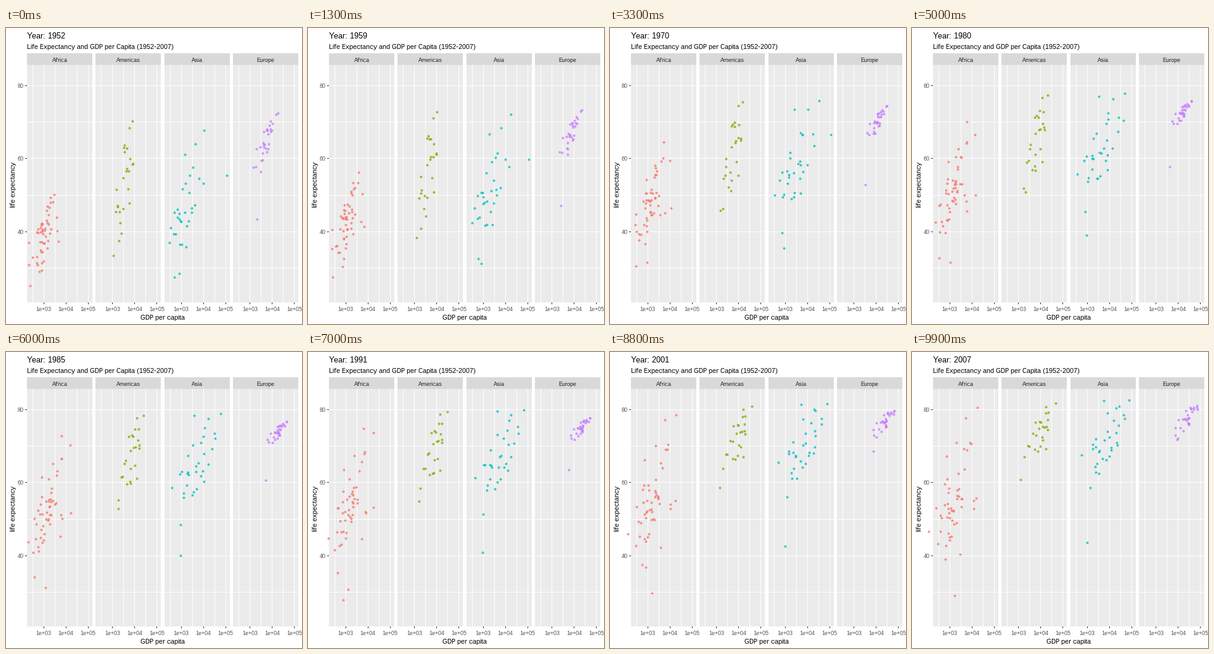
These frames come from a looping animation (480x480 px, 10 s). A matplotlib script:

```python
import numpy as np
import matplotlib.pyplot as plt
from matplotlib.animation import FuncAnimation
from matplotlib.patches import Rectangle

SIZE, DPI, FRAMES = 480, 72, 100
FIRST, MIDDLE, LAST = 1952, 1980, 2007
TOP, BOTTOM, LEFT, WIDTH, STEP = 60, 445, 34, 106, 111.5
GREY, DARK = "#4D4D4D", "#333333"

plt.rcParams["font.family"] = "Liberation Sans"
plt.rcParams["text.hinting"] = "native"
plt.rcParams["text.hinting_factor"] = 1

# Each facet is a cloud whose mean and spread follow parabolas through three
# years. "turn" is how far countries trade places, in radians; "loners" are
# (year, log GDP, life expectancy) paths away from the cloud.
FACETS = [
    dict(name="Africa", color="#F8766D", n=51, seed=3, corr=.45, turn=1.1,
         gdp=(2.99, 3.17, 3.19), gdp_sd=(.29, .38, .45),
         life=(39.1, 51.2, 55), life_sd=(5, 7, 9.4),
         loners=[[(1952, 2.69, 40), (1987, 2.93, 44), (1992, 2.87, 23.6),
                  (2007, 2.94, 46.2)]]),
    dict(name="Americas", color="#7CAE00", n=24, seed=8, corr=.65, turn=.5,
         gdp=(3.52, 3.82, 3.98), gdp_sd=(.25, .26, .3),
         life=(53.9, 66, 74.3), life_sd=(8.6, 6.2, 3.6),
         loners=[[(1952, 3.27, 37.6), (1980, 3.29, 51), (2007, 3.08, 60.9)]]),
    dict(name="Asia", color="#00BFC4", n=31, seed=5, corr=.7, turn=.6,
         gdp=(3.14, 3.57, 3.82), gdp_sd=(.4, .5, .5),
         life=(46.6, 63, 71.6), life_sd=(8.8, 8, 6.4),
         loners=[[(1952, 5.03, 55.6), (1972, 5.04, 67.7), (1982, 4.5, 71.3),
                  (2007, 4.67, 77.6)],
                 [(1952, 2.89, 28.8), (1980, 2.95, 39.2), (2007, 2.99, 43.8)]]),
    dict(name="Europe", color="#C77CFF", n=29, seed=2, corr=.87, turn=.5,
         gdp=(3.7, 4.19, 4.4), gdp_sd=(.25, .21, .27),
         life=(65.2, 73.2, 78), life_sd=(4.8, 2, 2.8),
         loners=[[(1952, 3.29, 43.6), (2007, 3.93, 71.8)]]),
]


def spread(lo, hi):
    pad = .05 * (hi - lo)
    return lo - pad, hi + pad


X0, X1 = spread(np.log10(241), np.log10(113523))
Y0, Y1 = spread(23.6, 82.6)


def px(log_gdp, col):
    return LEFT + STEP * col + (log_gdp - X0) / (X1 - X0) * WIDTH


def py(life):
    return TOP + .4 + (Y1 - life) / (Y1 - Y0) * (BOTTOM - TOP)


def scores(rng, n):
    z = np.clip(rng.normal(size=n), -2.2, 2.2)
    return (z - z.mean()) / z.std()


def parabola(values):
    return np.poly1d(np.polyfit([FIRST, MIDDLE, LAST], values, 2))


def make_cloud(f):
    """Return a function from year to every log GDP and life expectancy."""
    rng = np.random.default_rng(f["seed"])
    u0, v0, u1, v1 = (scores(rng, f["n"]) for _ in range(4))
    gdp, gdp_sd, life, life_sd = (
        parabola(f[k]) for k in ("gdp", "gdp_sd", "life", "life_sd"))
    r = f["corr"]

    def at(year):
        t = (year - FIRST) / (LAST - FIRST)
        c, s = np.cos(f["turn"] * t), np.sin(f["turn"] * t)
        u, v = c * u0 + s * u1, c * v0 + s * v1
        x = gdp(year) + gdp_sd(year) * u
        y = life(year) + life_sd(year) * (r * u + np.sqrt(1 - r * r) * v)
        cap = 73 + 10 * t
        y = cap - 2 * np.log1p(np.exp((cap - y) / 2))
        for path in f["loners"]:
            years, xs, ys = zip(*path)
            x = np.append(x, np.interp(year, years, xs))
            y = np.append(y, np.interp(year, years, ys))
        return x, y

    return at


fig = plt.figure(figsize=(SIZE / DPI, SIZE / DPI), dpi=DPI, facecolor="white")
ax = fig.add_axes([0, 0, 1, 1])
ax.set(xlim=(0, SIZE), ylim=(SIZE, 0))
ax.axis("off")


def box(x0, x1, y0, y1, color):
    ax.add_patch(Rectangle((x0, y0), x1 - x0, y1 - y0, fc=color, lw=0))


def hline(x0, x1, y, color):
    y = np.floor(y)
    box(x0, x1, y, y + 1, color)


def vline(x, y0, y1, color):
    x = np.floor(x)
    box(x, x + 1, y0, y1, color)


def label(x, y, s, size, color="black", **kw):
    return ax.text(x, y, s, size=size, color=color, **kw)


clouds, dots = [], []
for col, f in enumerate(FACETS):
    left, right = np.floor(LEFT + STEP * col + np.array([0, WIDTH]))
    box(left, right, 41, TOP, "#D9D9D9")
    box(left, right, TOP, BOTTOM, "#EBEBEB")
    label((left + right) / 2, 55, f["name"], 9, "#1A1A1A", ha="center")
    for life in range(30, 90, 10):
        hline(left, right, py(life), "white")
    for g in np.arange(2.5, 5.5, .5):
        vline(px(g, col), TOP, BOTTOM, "white")
    for g in (3, 4, 5):
        vline(px(g, col), BOTTOM, BOTTOM + 3, DARK)
        label(px(g, col), 459, f"1e+0{g}", 9, GREY, ha="center")
    clouds.append(make_cloud(f))
    dots.append(ax.scatter([], [], s=9, color=f["color"], alpha=.7,
                           linewidths=1, zorder=3))

for life in (40, 60, 80):
    hline(LEFT - 3, LEFT, py(life), DARK)
    label(29, py(life) + 3.5, str(life), 9, GREY, ha="right")

title = label(LEFT, 17, "", 13)
label(LEFT, 34, "Life Expectancy and GDP per Capita (1952-2007)", 11)
label(254, 473, "GDP per capita", 11, ha="center")
label(17, 254, "life expectancy", 11, rotation=90, ha="right", va="center")


def update(i):
    year = FIRST + (LAST - FIRST) * i / (FRAMES - 1)
    title.set_text(f"Year: {round(year)}")
    for col, (cloud, dot) in enumerate(zip(clouds, dots)):
        gdp, life = cloud(year)
        spots = np.column_stack([px(gdp, col), py(life)])
        dot.set_offsets(np.floor(spots) + .5)
    return [title, *dots]


anim = FuncAnimation(fig, update, frames=FRAMES, interval=100, repeat=True,
                     repeat_delay=0)
plt.show()
```
